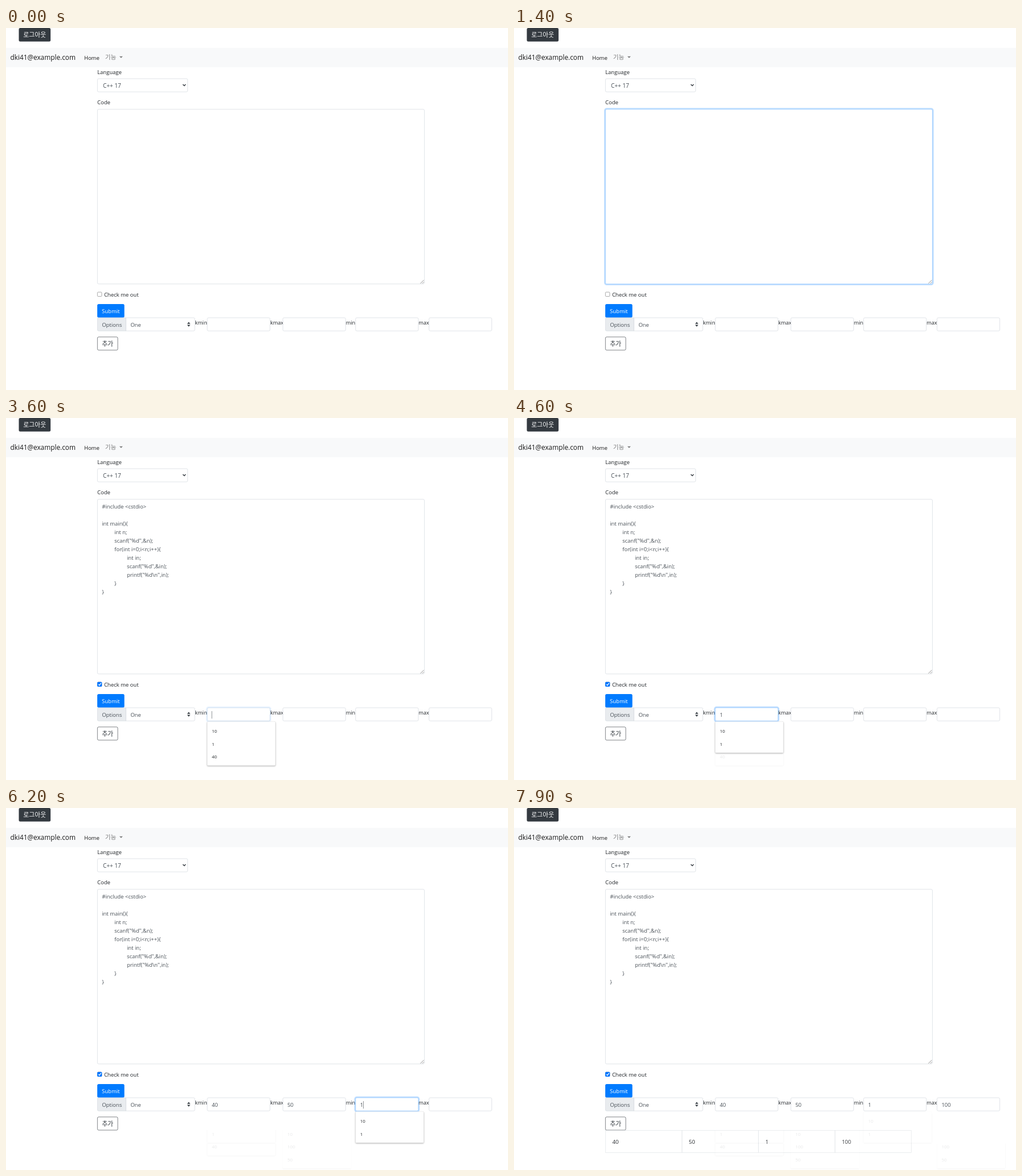
An HTML page that plays this animation: 880 px wide and 636 px high, repeating every 8000 ms.

```html
<!DOCTYPE html>
<html lang="ko">
<head>
<meta charset="utf-8">
<style>
  html, body { margin: 0; width: 100%; height: 100%; overflow: hidden; background: #fff; }
  /* The page is laid out at 1408 pixels and shown at 62.5 % */
  #stage { left: 0; top: 0; width: 1408px; height: 1018px; transform: scale(.625); transform-origin: 0 0;
    font: 15.2px/24px "Open Sans", "Noto Sans CJK KR", "Noto Sans CJK", sans-serif; color: #212529; }
  div, svg { position: absolute; box-sizing: border-box; white-space: pre; }
  .field { border: 1px solid #ced4da; border-radius: 4px; background: #fff; color: #495057; }
  .code { tab-size: 35px; color: #495057; }
  .caret { display: inline-block; width: 1px; height: 21px; margin-right: -1px; background: #495057; vertical-align: -5px; }
  .drop { border-radius: 3px; background: #fff; box-shadow: 0 0 1px #0005, 0 2px 4px #0004; font-size: 12.8px; }
  .btn { border-radius: 4px; text-align: center; }
  .cell { border: 1px solid #dee2e6; padding-left: 19px; line-height: 62px; }
</style>
</head>
<body>
<div id="stage"></div>
<script>
const LOOP = 8000;
const CODE = `#include <cstdio>

int main(){
\tint n;
\tscanf("%d",&n);
\tfor(int i=0;i<n;i++){
\t\tint in;
\t\tscanf("%d",&in);
\t\tprintf("%d\\n",in);
\t}
}`;
const stage = document.getElementById('stage');

function box(x, y, w, h, cls = '', css = '', parent = stage) {
  const el = document.createElement('div');
  el.className = cls;
  el.style.cssText = `left:${x}px;top:${y}px;width:${w}px;height:${h}px;${css}`;
  return parent.appendChild(el);
}

// Text whose first line is centred on cy.
function label(x, cy, text, css = '', parent = stage, cls = '') {
  const el = box(x, cy - 11.4, 0, 24, cls, css, parent);
  el.textContent = text;
  return el;
}

function button(x, y, w, text, css, size = 15.2) {
  const el = box(x, y, w, 38, 'btn', `line-height:38px;font-size:${size}px;${css}`);
  el.textContent = text;
  return el;
}

function shape(d, css) {
  stage.insertAdjacentHTML('beforeend',
    `<svg width="1408" height="1018" style="left:0;top:0"><path d="${d}" style="${css}"/></svg>`);
  return stage.lastElementChild;
}

// Page
button(36, 0, 89, '로그아웃', 'background:#343a40;color:#fff', 17.4);
box(0, 56, 1408, 54, '', 'background:#f8f9fa');
label(12, 82.5, 'dki41@example.com', 'font-size:18.9px;color:#000000e6');
label(219, 82.5, 'Home', 'color:#000000e6');
label(278, 81.5, '기능', 'font-size:17px;color:#00000080');
shape('M318 79.5h9.6l-4.8 4.8z', 'fill:#00000080');

label(256, 122, 'Language');
box(256, 142, 254, 38, 'field');
label(272, 161, 'C++ 17', 'font-size:16px;color:#495057');
shape('M496 158.5l4 4l4-4', 'fill:none;stroke:#343a40;stroke-width:2.2');

label(256, 208, 'Code');
const area = box(256, 228, 918, 492, 'field');
const code = label(269, 247, '', '', undefined, 'code');
shape('M1162.5 718l9.5-9.5M1168 718l4-4', 'fill:none;stroke:#777;stroke-width:1.3');

box(256, 742, 13, 13, '', 'border:1px solid #767676;border-radius:2.5px');
const check = box(256, 742, 13, 13, '', 'background:#0075ff;border-radius:2.5px');
const tick = shape('M259.2 748.5l2.6 3l5-6.4', 'fill:none;stroke:#fff;stroke-width:2');
label(275, 748, 'Check me out');
button(256, 776, 76, 'Submit', 'background:#007bff;color:#fff');

box(256, 814, 81, 38, 'field', 'background:#e9ecef;border-radius:4px 0 0 4px');
label(269, 833, 'Options', 'color:#495057');
box(336, 814, 194, 38, 'field', 'border-radius:0 4px 4px 0');
label(349, 833, 'One', 'color:#495057');
shape('M508 831.5h9l-4.5-5zM508 834.5h9l-4.5 5z', 'fill:#343a40');

// Each field: focus and blur times, then edits as [time, value]
const fields = [
  { name: 'kmin', at: 530, x: 564, focus: 3600, blur: 5100, edits: [[4000, '1'], [4100, '1'], [4700, '4'], [4800, '40']] },
  { name: 'kmax', at: 741, x: 776, focus: 5100, blur: 5700, edits: [[5400, '5'], [5500, '50']] },
  { name: 'min', at: 953, x: 980, focus: 5700, blur: 6400, edits: [[6100, '1']] },
  { name: 'max', at: 1157, x: 1186, focus: 6400, blur: 7000, edits: [[6600, '1'], [6800, '100']] },
];
for (const f of fields) {
  label(f.at, 826, f.name, 'font-size:14.7px');
  f.el = box(f.x, 814, 177, 38, 'field');
  f.text = label(f.x + 13, 833, '', 'color:#495057');
}
const editor = { el: area, text: code, focus: 900, blur: 3100, edits: [[1500, CODE]] };
const inputs = [editor, ...fields];

const add = button(256, 868, 58, '추가', 'border:1px solid #343a40;line-height:36px', 17.4);
const table = box(256, 906, 859, 63);
['40', '50', '1', '100'].forEach((v, i) => {
  box(i * 214.5, 0, 215.5, 63, 'cell', '', table).textContent = v;
});

// Suggestion lists: field, open, close, items, and where the faint remainder starts
const drops = [
  [0, 3600, 4000, ['10', '1', '40'], 90],
  [0, 4000, 4700, ['10', '1'], 52],
  [0, 4700, 4800, ['40']],
  [1, 5100, 5400, ['1', '10', '100', '50'], 52],
  [1, 5400, 5500, ['50']],
  [2, 5700, 6400, ['10', '1'], -6],
  [3, 6400, 6600, ['1', '10', '100', '50'], 90],
  [3, 6600, 6800, ['10', '100']],
].map(([i, open, close, items, rest]) => {
  const el = box(fields[i].x, 853, 192, 16 + 36 * items.length, 'drop');
  items.forEach((v, k) => label(13, 26 + 36 * k, v, '', el));
  return { el, open, close, rest };
});

const clamp = v => Math.max(0, Math.min(1, v));
const ramp = (t, start) => t < start ? 0 : clamp((t - start + 50) / 150);
const mix = (a, b, k) => `rgb(${a.map((v, i) => v + (b[i] - v) * k)})`;
const show = (el, on) => { el.style.display = on ? '' : 'none'; };

function drawInput({ el, text, focus, blur, edits }, t) {
  const glow = ramp(t, focus) - ramp(t, blur);
  el.style.borderColor = mix([206, 212, 218], [128, 189, 255], glow);
  el.style.boxShadow = `0 0 0 3.2px rgba(0,123,255,${.25 * glow})`;
  const [last, value] = edits.filter(e => e[0] <= t).pop() || [focus, ''];
  text.textContent = value;
  if (t >= focus && t < blur && Math.floor((t - last) / 500) % 2 === 0) {
    text.insertAdjacentHTML('beforeend', '<span class="caret"></span>');
  }
}

function render(t) {
  inputs.forEach(input => drawInput(input, t));
  for (const { el, open, close, rest } of drops) {
    const active = t >= open && t < close;
    show(el, active || (t >= close && rest !== undefined));
    el.style.opacity = active ? 1 : .1;
    el.style.clipPath = active ? 'none' : `inset(${rest}px -6px -6px -6px)`;
  }
  show(check, t >= 3200);
  show(tick, t >= 3200);
  show(table, t >= 7600);
  const hover = ramp(t, 7500) - ramp(t, 7800);
  add.style.background = `rgba(52,58,64,${hover})`;
  add.style.color = mix([52, 58, 64], [255, 255, 255], hover);
}

// The screen advances ten times a second.
let shown = -1;
function frame() {
  const t = Math.floor(performance.now() % LOOP / 100) * 100;
  if (t !== shown) render(shown = t);
  requestAnimationFrame(frame);
}
frame();
</script>
</body>
</html>
```
